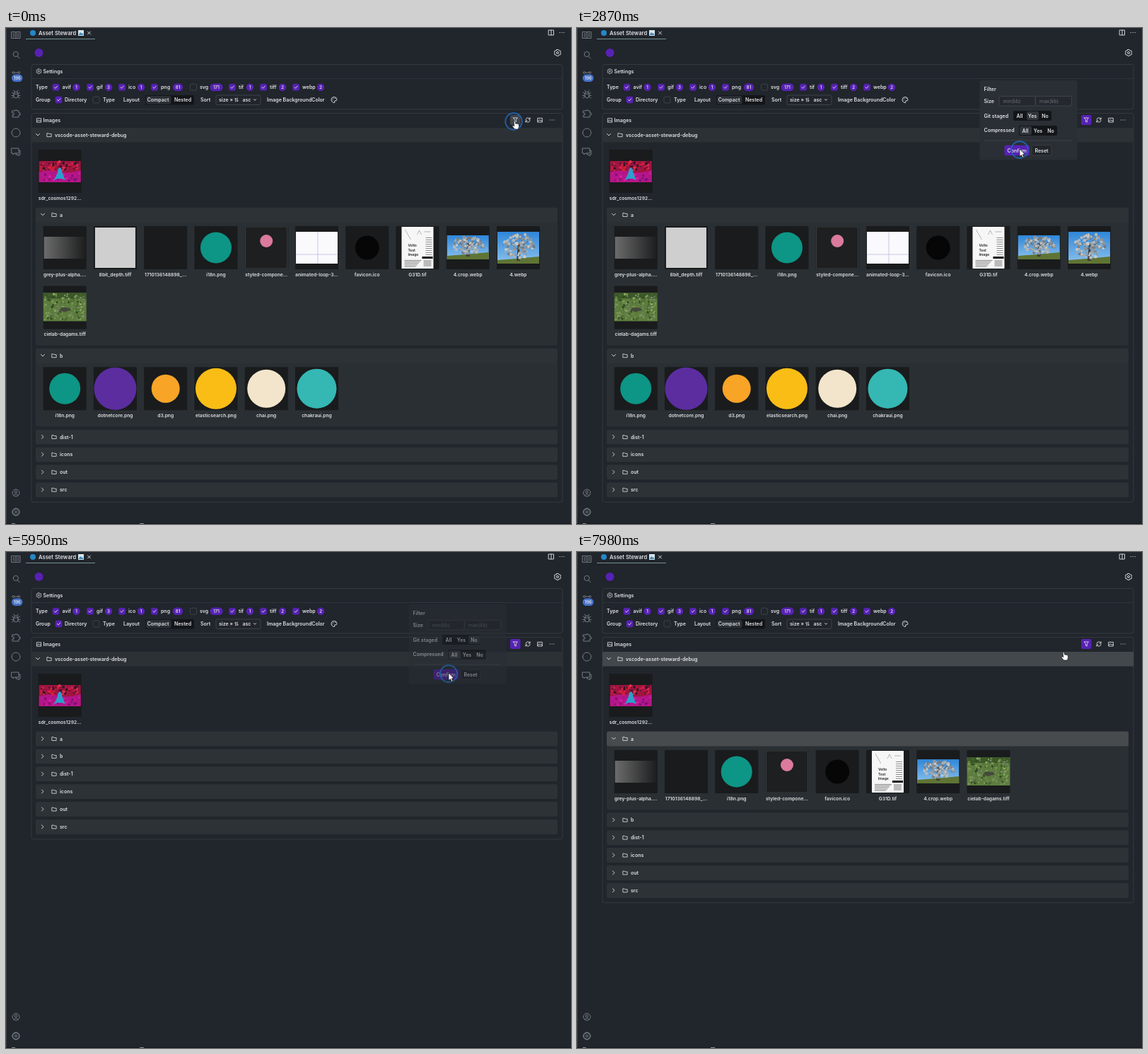
Animation, 799 px wide and 701 px high, one loop 8000 ms. Source, as an HTML page:

```html
<!DOCTYPE html>
<html lang="en">
<head>
<meta charset="utf-8">
<title>Asset Steward</title>
<style>
  html, body { margin: 0; width: 100%; height: 100%; overflow: hidden; background: #21252c; }
  body > svg { display: block; width: 100vw; height: 100vh; }
  text { font: 600 7px Inter, "Open Sans", sans-serif; fill: #e0e2e4; white-space: pre; }
  .mid { text-anchor: middle; }
  .dim { fill: #6a6f76; font-weight: 400; }
  .icon { fill: none; stroke: #d0d3d6; stroke-width: 1; stroke-linejoin: round; stroke-linecap: round; }
  .bar .icon { stroke: #747a83; }
  .card { fill: none; stroke: #3a3f45; stroke-width: .8; }
</style>
</head>
<body>
<svg id="stage" viewBox="0 0 799 701">
  <g id="chrome"></g>
  <g id="list"></g>
  <rect id="hoverRoot" x="36" y="141" width="751" height="20.5" fill="#fff"/>
  <rect id="hoverA" x="42" y="253.5" width="738" height="21" rx="3" fill="#fff"/>
  <g id="tools"></g>
  <g id="popover"></g>
  <circle id="ring" fill="none" stroke="#2066b4" stroke-width="1.8"/>
  <g id="pointer" stroke="#15171a" stroke-width=".7" stroke-linejoin="round" fill="#fff">
    <path id="hand" d="M0 .6Q1-.4 1.8.8L2.7 4.2 4 4 5.3 4.6 6.6 4.7 7.4 5.8V8.5L6.4 12H1.5L-1.8 8.2Q-2.4 6.5-.8 6.7L.7 7.8Z"/>
    <path id="arrow" d="M0 0V10.5L2.4 8.4 4 12 5.8 11.2 4.2 7.8H7.4Z"/>
  </g>
</svg>
<script>
const LOOP = 8000, STEP = 70, PURPLE = '#5722b4', TILE = 61, PITCH = 71.25;
const el = id => document.getElementById(id);
const clamp = v => Math.min(1, Math.max(0, v));
const ease = v => (v = clamp(v)) * v * (3 - 2 * v);
const ramp = (t, from, length) => ease((t - from) / length);

// Drawing helpers
const text = (x, y, s, attrs = '') => `<text x="${x}" y="${y}" ${attrs}>${s}</text>`;
const mid = (x, y, s, attrs = '') => text(x, y, s, `class="mid" ${attrs}`);
const rect = (x, y, w, h, fill, attrs = '') =>
  `<rect x="${x}" y="${y}" width="${w}" height="${h}" fill="${fill}" ${attrs}/>`;
const circle = (x, y, r, fill) => `<circle cx="${x}" cy="${y}" r="${r}" fill="${fill}"/>`;
const path = (d, fill) => `<path d="${d}" fill="${fill}"/>`;
const icon = (x, y, d, turn = 0, size = 1) =>
  `<path class="icon" transform="translate(${x} ${y}) rotate(${turn}) scale(${size})" d="${d}"/>`;
const dot = r => `M${-r} 0a${r} ${r} 0 1 0 ${2 * r} 0a${r} ${r} 0 1 0 ${-2 * r} 0`;

const ICON = {
  gear: dot(1.5) + 'M-1.2-4.5H1.2L2-3 4-2.8 4.6-.8 3.6 0 4.6.8 4 2.8 2 3 1.2 4.5H-1.2L-2 3-4 2.8-4.6.8-3.6 0-4.6-.8-4-2.8-2-3Z',
  chevron: 'M-1.5-2.5L1 0-1.5 2.5',
  folder: 'M-3.5 2.5V-2.5H-1L0-1.5H3.5V2.5Z',
  image: 'M-3.5 2.8V-2.8H3.5V2.8ZM-3 2L-.8-.5.8 1.2 1.8.2 3.4 2',
  filter: 'M-3.2-3.2H3.2L1-.2V3.2L-1 2.4V-.2Z',
  refresh: 'M-3.2-.6A3.2 3.2 0 0 1 2.6-1.9L3.2-3M3.2-3V-.9H1.2M3.2.6A3.2 3.2 0 0 1-2.6 1.9L-3.2 3M-3.2 3V.9H-1.2',
  more: 'M-3 0h.3M0 0h.3M3 0h.3',
  close: 'M-2-2L2 2M2-2L-2 2',
  split: 'M-3.5-3.5H3.5V3.5H-3.5ZM0-3.5V3.5',
  palette: 'M0 4A4 4 0 1 1 4 0Q4 1.5 2 1.2 0 1 .8 3 1 4 0 4ZM-2 0h.1M-1-2h.1M1.4-2h.1',
  book: 'M-6-4.5H-1Q0-4.5 0-3.5 0-4.5 1-4.5H6V4.5H0-6ZM0-3.5V4.5M-4-2H-2M-4 0H-2M-4 2H-2M2-2H4M2 0H4M2 2H4',
  search: 'M-3.8-1a3.6 3.6 0 1 0 7.2 0a3.6 3.6 0 1 0-7.2 0M2.4 1.8L5.2 5',
  branch: 'M-5-3a1.4 1.4 0 1 0 2.8 0a1.4 1.4 0 1 0-2.8 0M3-3a1.4 1.4 0 1 0 2.8 0a1.4 1.4 0 1 0-2.8 0M-2.2-3H3',
  bug: 'M-3-1Q-3-4 0-4 3-4 3-1V2Q3 5 0 5-3 5-3 2ZM-3-1H3M-5.5-3L-3-1M5.5-3L3-1M-6 1.5H-3M6 1.5H3M-5.5 5L-3 3M5.5 5L3 3M-2-4L-3-6M2-4L3-6',
  puzzle: 'M-5-4H-1V-5H1.5V-4H4V-1H6V2H4V5H-5V2H-3V-1H-5Z',
  chat: 'M-6-5H4V2H-2L-4 4V2H-6ZM4-2H6V4H4V6L2 4H0V2',
  account: dot(5) + 'M-1.7-1.2a1.7 1.7 0 1 0 3.4 0a1.7 1.7 0 1 0-3.4 0M-3.2 3.7Q0-.2 3.2 3.7',
};

// Tile pictures, each in a 61 x 61 box
let seed = 7;
const rnd = (a, b) => a + (seed = seed * 16807 % 2147483647) / 2147483647 * (b - a);
const repeat = (n, draw) => Array.from({ length: n }, (_, i) => draw(i)).join('');
const speck = (x, y, r, fill) => circle(x.toFixed(1), y.toFixed(1), rnd(r / 3, r).toFixed(1), fill);
const specks = (n, x0, y0, x1, y1, r, colors) => repeat(n, i =>
  speck(rnd(x0 + r, x1 - r), rnd(y0 + r, y1 - r), r, colors[i % colors.length]));
const crown = (n, cx, cy, rx, ry, r, colors) => repeat(n, i => {
  const angle = rnd(0, 2 * Math.PI), reach = Math.sqrt(rnd(0, 1));
  return speck(cx + rx * reach * Math.cos(angle), cy + ry * reach * Math.sin(angle), r, colors[i % colors.length]);
});
const shade = (id, attrs, from, to) =>
  `<linearGradient id="${id}" ${attrs}><stop stop-color="${from}"/><stop offset="1" stop-color="${to}"/></linearGradient>`;
const badge = (r, fill) => circle(30.5, 30.5, r, fill);
const tree = (top, bottom) => shade('sky' + top, 'x2="0" y2="1"', '#2f86d8', '#8cc2ee')
  + rect(1, top, 59, bottom - top, `url(#sky${top})`)
  + path(`M1 ${bottom}V${bottom - 5}Q30 ${bottom - 7} 60 ${bottom - 10}V${bottom}Z`, '#5f7434')
  + path(`M28 ${bottom - 4}L30 24H32L33 ${bottom - 4}Z`, '#453d38')
  + '<path d="M31 34L18 23M31 33L44 22M31 30L26 18M31 30L38 17" stroke="#5c5450" stroke-width="1" fill="none"/>'
  + crown(130, 31, (top + bottom) / 2 - 3, 22, (bottom - top) / 2 - 5, 2.4, ['#a3a9ab', '#c9cbca', '#777c80', '#b4b9bb', '#8f9498']);

const ART = {
  cosmos: rect(1, 16, 59, 30, '#a01540') + path('M1 32Q20 27 30 31T60 29V46H1Z', '#b5168a')
    + specks(70, 1, 15, 60, 31, 2.2, ['#dc1f38', '#3a1526', '#c81a44', '#6a1232', '#e03050'])
    + specks(36, 1, 31, 60, 46, 2, ['#d320a8', '#7a1178', '#c0148c', '#94146a'])
    + path('M22 43L27 33 28 27 31 25 33 28 34 33 38 43 33 41 27 41Z', '#2aa0cc'),
  grey: shade('fade', '', '#6c6c6c', '#1c1d1e') + rect(1, 15, 59, 31, 'url(#fade)'),
  plain: rect(2, 2, 57, 57, '#cfcfcf'),
  blank: '',
  flask: badge(22, '#0d9585'),
  styled: rect(1, 1, 59, 59, '#1d1f20', 'stroke="#4b4d4f" stroke-width=".7"') + circle(30.5, 21, 9, '#db7a9c'),
  plot: rect(1, 8, 59, 45, '#fafafc') + '<path d="M1 40H60M32 8V53" fill="none" stroke="#aaa2d8" stroke-width=".6"/>',
  triangle: badge(17, '#060606'),
  page: rect(8, 1, 45, 59, '#f6f6f6') + '<path d="M13 5L21 19M30 12L33 6 36 12M40 8H49" stroke="#888" stroke-width=".6" fill="none"/>'
    + ['Velto', 'Test', 'Image'].map((s, i) => text(17, 29 + i * 6.5, s, 'style="font-size:5px;fill:#222"')).join('')
    + repeat(9, i => rect(42, 16 + i * 3, 9, 1, '#8d8d8d')) + rect(37, 43, 15, 3, '#111')
    + repeat(5, i => rect(12, 48 + i * 2.2, 24 - i * 2, .9, '#777')) + rect(39, 48, 11, 9, '#bbb'),
  treeCrop: tree(13, 47),
  tree: tree(8, 53),
  meadow: rect(0, 10, 61, 40, '#5d7d3e') + rect(0, 10, 61, 8, '#3c5829')
    + specks(190, 0, 10, 61, 50, 1.7, ['#7b9a51', '#496a30', '#8ca866', '#344a24', '#76856b'])
    + path('M22 34L27 30 37 31 40 34 30 37Z', '#444a3b'),
  net: badge(30, '#5b2d9f'),
  flame: badge(20, '#f8a427'),
  search: badge(29, '#f9bd16'),
  chai: badge(27, '#f2e5cb'),
  bolt: badge(28, '#35b7b4'),
};

const COSMOS = ['cosmos', 'sdr_cosmos1292...'];
const FOLDER_A = [
  ['grey', 'grey-plus-alpha....'], ['plain', '8bit_depth.tiff'], ['blank', '1710136148898_...'],
  ['flask', 'i18n.png'], ['styled', 'styled-compone...'], ['plot', 'animated-loop-3...'],
  ['triangle', 'favicon.ico'], ['page', 'G31D.tif'], ['treeCrop', '4.crop.webp'],
  ['tree', '4.webp'], ['meadow', 'cielab-dagams.tiff'],
];
const FOLDER_B = [
  ['flask', 'i18n.png'], ['net', 'dotnetcore.png'], ['flame', 'd3.png'],
  ['search', 'elasticsearch.png'], ['chai', 'chai.png'], ['bolt', 'chakraui.png'],
];
const UNSTAGED_A = FOLDER_A.filter(([art]) => !['plain', 'plot', 'tree'].includes(art));

const tile = (x, y, [art, label]) => `<g transform="translate(${x} ${y})">`
  + rect(0, 0, TILE, TILE, '#191b1c', 'rx="1"') + ART[art] + mid(30.5, 71, label, 'style="font-size:6.7px"') + '</g>';

function section(y, { name, tiles = [], open = 0 }) {
  const height = 21 + open * (5.5 + 84.4 * Math.ceil(tiles.length / 10));
  const body = open ? tiles.map((item, i) =>
    tile(10.7 + i % 10 * PITCH, 26.5 + 84.4 * Math.floor(i / 10), item)).join('') : '';
  return { height, svg: `<svg x="42" y="${y}" width="738" height="${height}">`
    + rect(0, 0, 738, height, '#2a2f33', 'rx="3"') + rect(0, 0, 738, 21, '#2d3236', 'rx="3"')
    + icon(10, 10.3, ICON.chevron, 90 * open) + icon(26, 10.3, ICON.folder, 0, .9) + text(34, 13, name) + body + '</svg>' };
}

function fileList(images, sections) {
  let y = 168.7, svg = '';
  if (images.length) {
    svg += images.map((item, i) => tile(45.7 + i * PITCH, 172, item)).join('');
    y = 253.5;
  }
  for (const item of sections) {
    const part = section(y, item);
    svg += part.svg;
    y += part.height + 3.9;
  }
  return rect(36, 120.5, 751, y + 3 - 120.5, 'none', 'class="card" rx="3"')
    + rect(36, 141, 751, 20.5, '#2c3136')
    + icon(45, 151, ICON.chevron, 90) + icon(61, 151, ICON.folder, 0, .9) + text(69, 153.6, 'vscode-asset-steward-debug')
    + icon(46.5, 130.3, ICON.image, 0, .9) + text(52.5, 132.7, 'Images') + svg;
}

const closed = (...names) => names.map(name => ({ name }));
const VIEWS = {
  all: () => fileList([COSMOS], [{ name: 'a', tiles: FOLDER_A, open: 1 }, { name: 'b', tiles: FOLDER_B, open: 1 },
    ...closed('dist-1', 'icons', 'out', 'src')]),
  staged: () => fileList([], closed('a', 'b')),
  unstaged: open => fileList([COSMOS], [{ name: 'a', tiles: UNSTAGED_A, open }, ...closed('b', 'dist-1', 'icons', 'out', 'src')]),
};

// Fixed surroundings
const checkbox = (x, y, on) => rect(x - 4.5, y - 4.5, 9, 9, on ? PURPLE : 'none', `rx="1.8" stroke="${on ? PURPLE : '#4a4f56'}" stroke-width=".7"`)
  + (on ? icon(x, y, 'M-2 0L-.6 1.6 2.2-1.6') : '');
const typeFilter = ([x, label, count, badgeX, off]) => {
  const width = 6.5 + 3.9 * String(count).length;
  return checkbox(x, 83.7, !off) + text(x + 9, 86.3, label)
    + rect(badgeX - width / 2, 78.5, width, 10.5, PURPLE, 'rx="5.2"')
    + mid(badgeX, 86, count, 'style="font-size:6px"');
};
const TYPES = [[70.5, 'avif', 1, 99.5], [119, 'gif', 3, 145], [164, 'ico', 1, 191], [210, 'png', 81, 243],
  [265, 'svg', 171, 297.5, true], [320, 'tif', 1, 345], [364, 'tiff', 2, 391], [410, 'webp', 2, 445]];
const SIDEBAR = [['book', 10], ['search', 38], ['branch', 66], ['bug', 94], ['puzzle', 121], ['chat', 175], ['account', 657], ['gear', 684]];

el('chrome').innerHTML = rect(0, 0, 799, 701, '#21252c') + rect(0, 0, 1, 701, '#3b4047') + rect(0, 700, 799, 1, '#14171b')
  + '<g class="bar">' + SIDEBAR.map(([name, y]) => icon(14, y, ICON[name])).join('')
  + icon(14, 148, dot(6)) + icon(14, 684, dot(5.2)) + '</g>'
  + rect(8, 65.5, 15.5, 10.5, '#4673c9', 'rx="5.2"') + mid(15.8, 73, '196', 'style="font-size:6px"')
  + circle(38, 7, 4, '#2488c8') + text(46, 9.7, 'Asset Steward', 'style="font-size:7.6px"')
  + rect(102, 3, 8, 8, '#d5e5ee') + path('M102.5 10L105 6 107 8 108 7 109.5 10Z', '#3b84b2')
  + icon(117.5, 7, ICON.close) + rect(28, 15, 98, 1, '#73918f')
  + icon(771, 6.5, ICON.split) + icon(786, 6.5, ICON.more)
  + circle(46.5, 35, 6, PURPLE) + icon(780, 35, ICON.gear)
  + rect(36, 51.5, 751, 63.5, 'none', 'class="card" rx="3"') + rect(36, 71, 751, .8, '#343940')
  + icon(46.5, 61.2, ICON.gear, 0, .75) + text(52.5, 63.8, 'Settings')
  + text(42, 86.3, 'Type') + TYPES.map(typeFilter).join('')
  + text(42, 104.2, 'Group') + checkbox(74.5, 101.5, true) + text(83, 104.2, 'Directory')
  + checkbox(127.5, 101.5, false) + text(137, 104.2, 'Type') + text(166, 104.2, 'Layout')
  + rect(197, 95, 69, 13.5, '#131518', 'rx="2"') + rect(198, 96, 35.5, 11.5, '#2b3036', 'rx="2"')
  + mid(215, 104.2, 'Compact') + mid(250, 104.2, 'Nested') + text(275, 104.2, 'Sort')
  + rect(297, 95, 63, 13.5, '#22262c', 'rx="2" stroke="#4a4f56" stroke-width=".7"')
  + text(301, 104.2, 'size »') + icon(327, 101.5, 'M-2.2 2.5V-2.5L-3.4-1.2M0-2.5V2.5L1.2 1.2') + text(334.5, 104.2, 'asc')
  + icon(352, 101.5, 'M-1.5-.8L0 .8 1.5-.8')
  + text(369, 104.2, 'Image BackgroundColor') + icon(464, 101.5, ICON.palette)
  + rect(8, 700, 5, 1, '#8a9097') + rect(189, 700, 6, 1, '#8a9097');

const toolbar = fill => rect(713, 123, 14.5, 14, fill, 'rx="2"')
  + ['filter', 'refresh', 'image', 'more'].map((name, i) => icon([720.3, 738, 755, 772][i], 130, ICON[name], 0, .95)).join('');

const segments = (x, y, selected, hovered) => rect(x, y, 54, 14, '#131619', 'rx="2"')
  + ['All', 'Yes', 'No'].map((label, i) =>
    rect(x + 1 + i * 18, y + 1, 17, 12, i === selected ? '#30353b' : i === hovered ? '#292d32' : 'none', 'rx="2"')
    + mid(x + 9 + i * 18, y + 9.6, label)).join('');
const field = (x, hint) => rect(x, 96.5, 51, 13.5, '#25292f', 'rx="1.5" stroke="#474c53" stroke-width=".7"')
  + text(x + 5.5, 105.8, hint, 'class="dim"');
const popover = (selected, hovered) => rect(569.5, 74, 138, 112.5, '#2a2f35', 'rx="3"')
  + text(575.5, 88.7, 'Filter') + text(575.5, 106, 'Size') + field(597, 'min(kb)') + field(648.5, 'max(kb)')
  + text(575.5, 126.7, 'Git staged') + segments(617, 117, selected, hovered)
  + text(575.5, 147.4, 'Compressed') + segments(625, 138, 0, -1)
  + rect(576, 158.5, 124, .8, '#42474d')
  + rect(604.5, 165.7, 35.5, 14.5, PURPLE, 'rx="2"') + mid(622.2, 175.5, 'Confirm')
  + rect(643, 165.7, 28, 14.5, '#22262b', 'rx="2" stroke="#43484e" stroke-width=".7"') + mid(657, 175.5, 'Reset');

// Timeline: pointer stops as [time, x, y]
const STOPS = [[0, 718, 131], [490, 718, 131], [1260, 650, 124], [1820, 650, 124], [2520, 626, 171], [3010, 626, 171],
  [3640, 714, 139], [3780, 718, 131], [4060, 718, 131], [4830, 664, 123], [5250, 664, 123], [5740, 626, 171],
  [6020, 626, 171], [6700, 361, 262], [7840, 361, 262], [7980, 687, 141]];
const CLICKS = [-70, 1680, 2800, 3850, 5040, 5810, 7000];

function pointerAt(t) {
  const next = STOPS.findIndex(stop => stop[0] > t);
  if (next < 0) return STOPS.at(-1).slice(1);
  if (next === 0) return STOPS[0].slice(1);
  const [t0, x0, y0] = STOPS[next - 1], [t1, x1, y1] = STOPS[next];
  const p = ramp(t, t0, t1 - t0);
  return [x0 + (x1 - x0) * p, y0 + (y1 - y0) * p];
}

const over = (t, x0, y0, x1, y1) => {
  const [x, y] = pointerAt(t);
  return x >= x0 && x <= x1 && y + 3 >= y0 && y + 3 <= y1;
};

const drawn = {};
function update(id, key, draw) {
  if (drawn[id] === key) return;
  drawn[id] = key;
  el(id).innerHTML = draw();
}

function render(t) {
  const [x, y] = pointerAt(t);
  const view = t < 3000 ? 'all' : t < 5950 ? 'staged' : 'unstaged';
  const open = ramp(t, 7000, 280);
  update('list', view + open, () => VIEWS[view](open));

  const shown = ramp(t, 140, 200) - ramp(t, 2900, 180) + ramp(t, 3900, 200) - ramp(t, 5860, 180);
  const selected = t < 1680 ? 0 : t < 5040 ? 1 : 2;
  const hovered = over(t, 617, 117, 671, 131) ? Math.floor((x - 617) / 18) : -1;
  update('popover', `${selected},${hovered}`, () => popover(selected, hovered));
  el('popover').style.opacity = shown;

  const filterFill = t >= 2800 ? PURPLE : over(t, 712, 123, 728, 137) ? '#41464c' : 'none';
  update('tools', filterFill, () => toolbar(filterFill));

  const rootHover = shown < .5 && over(t, 36, 141, 787, 161);
  const folderHover = view === 'unstaged' && (over(t, 42, 254, 780, 275) || over(t - 140, 42, 254, 780, 275));
  el('hoverRoot').style.opacity = rootHover ? .11 : 0;
  el('hoverA').style.opacity = folderHover ? .12 : 0;

  const click = CLICKS.filter(c => c <= t).at(-1), age = (t - click) / 300;
  const [cx, cy] = pointerAt(click);
  const ring = el('ring');
  ring.setAttribute('cx', cx);
  ring.setAttribute('cy', cy + 1);
  ring.setAttribute('r', 11.5 + age);
  ring.style.opacity = age < 1 ? 1 - age * age : 0;

  const arrow = t > 2000 && t < 3500 || t > 5350 && t < 6500;
  el('arrow').style.display = arrow ? '' : 'none';
  el('hand').style.display = arrow ? 'none' : '';
  el('pointer').setAttribute('transform', `translate(${x} ${y})`);
}

const start = performance.now();
function tick() {
  const t = (performance.now() - start) % LOOP;
  render(Math.floor(t / STEP) * STEP);
  requestAnimationFrame(tick);
}
tick();
</script>
</body>
</html>
```
